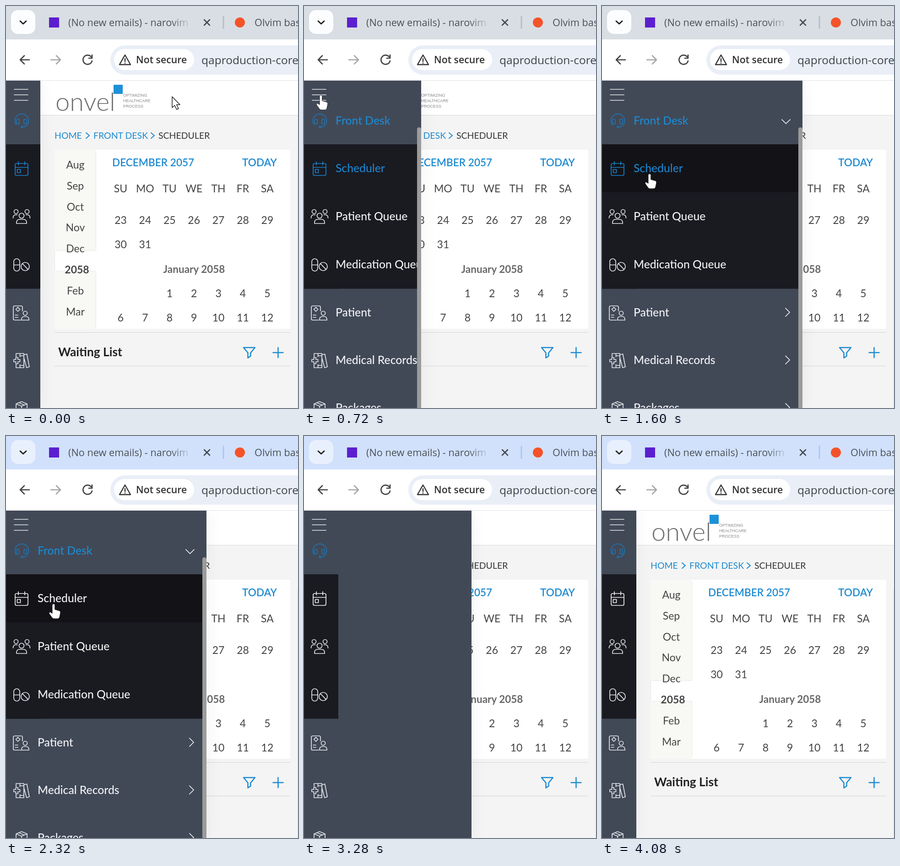
Write an HTML page that moves like this. It is 638 px wide and 878 px high and loops after 4.64 s.

```html
<!DOCTYPE html>
<html lang="en">
<head>
<meta charset="utf-8">
<title>Scheduler menu</title>
<style>
html, body { margin: 0; width: 100%; height: 100%; overflow: hidden; background: #f4f4f4; }
svg { position: absolute; left: 0; top: 0; display: block; }
text { font-family: Lato, sans-serif; white-space: pre; }
.ui text { font-family: "Open Sans", "Noto Sans", sans-serif; }
.line { fill: none; stroke: currentColor; stroke-width: 2; stroke-linecap: round; stroke-linejoin: round; }
.blue { fill: #1c8ad0; }
.mid { text-anchor: middle; }
#cal { font-size: 23px; fill: #444; }

#drawer {
  position: absolute; left: 0; top: 163px; width: 75px; height: 715px;
  overflow: hidden; background: #414957; color: #e4e6ea;
  box-shadow: 0 0 36px rgba(0, 0, 0, .06); clip-path: inset(0 -50px 0 0);
}
#drawer text { font-size: 24.7px; font-weight: 500; fill: currentColor; }
#drawer .line { stroke-width: 1.7; }
#thumb {
  position: absolute; right: 0; top: 102px; width: 9px; height: 640px;
  border-radius: 5px; background: #9b9b9b;
}

/* One step is 80 ms, 58 steps per loop */
.k { animation: 4.64s step-end infinite; }
#drawer { animation-name: slide; }
.open { animation-name: open; }
#hover { animation-name: hover; }
#cursor { animation-name: move; }
#arrow { animation-name: arrow; }
#hand { animation-name: hand; }
.fade { animation: 4.64s linear infinite; }
#strip { animation-name: strip; }
#tabs { animation-name: tabs; }
#sep { animation-name: sep; }
.sched { animation-name: sched; }

@keyframes slide {
  0% { width: 75px } 13.79% { width: 90px } 15.51% { width: 256px }
  17.24% { width: 385px } 18.96% { width: 429px } 20.68% { width: 438px }
  70.68% { width: 366px } 72.41% { width: 190px } 74.13% { width: 108px }
  75.86% { width: 81px } 77.58%, 100% { width: 75px }
}
@keyframes open { 0% { opacity: 0 } 13.79% { opacity: 1 } 68.96%, 100% { opacity: 0 } }
@keyframes hover { 0% { opacity: 0 } 32.75% { opacity: 1 } 67.24%, 100% { opacity: 0 } }
@keyframes move {
  0% { transform: translate(363px, 198px) } 1.72% { transform: translate(350px, 198px) }
  3.44% { transform: translate(315px, 199px) } 5.17% { transform: translate(262px, 200px) }
  6.89% { transform: translate(205px, 202px) } 8.62% { transform: translate(155px, 203px) }
  10.34% { transform: translate(115px, 204px) } 12.06% { transform: translate(87px, 204px) }
  13.79% { transform: translate(37px, 195px) } 29.31% { transform: translate(46px, 214px) }
  31.03% { transform: translate(70px, 272px) } 32.75% { transform: translate(95px, 338px) }
  34.48%, 100% { transform: translate(104px, 367px) }
}
@keyframes arrow { 0% { opacity: 1 } 13.79%, 100% { opacity: 0 } }
@keyframes hand { 0% { opacity: 0 } 13.79% { opacity: 1 } 67.24%, 100% { opacity: 0 } }
@keyframes strip { 0%, 42.5% { fill: #d9dee4 } 48.27%, 100% { fill: #d1e1fc } }
@keyframes tabs { 0%, 42.5% { fill: #fcfdfe } 48.27%, 100% { fill: #e9f0fd } }
@keyframes sep { 0%, 42.5% { fill: #b9bec5 } 48.27%, 100% { fill: #a8c7f8 } }
@keyframes sched { 0%, 42.5% { color: #1b84cc } 48.27%, 100% { color: #f2f2f4 } }
</style>
</head>
<body>
<svg width="638" height="878" viewBox="0 0 638 878">
  <defs>
    <linearGradient id="tail" gradientUnits="userSpaceOnUse" x1="360" x2="406" y1="0" y2="0">
      <stop stop-color="#4b5058"/><stop offset="1" stop-color="#4b5058" stop-opacity="0"/>
    </linearGradient>
  </defs>

  <g class="ui">
    <rect id="strip" class="fade" width="638" height="74"/>
    <rect id="tabs" class="fade" x="11" y="9" width="53" height="52" rx="15"/>
    <path class="line" style="stroke-width:3" color="#222" d="M31 33l6.500 6 6.500-6"/>
    <rect x="94" y="25" width="22" height="22" fill="#5b1fd0"/>
    <text x="136" y="44" font-size="21.700" fill="url(#tail)">(No new emails) - narovim</text>
    <path class="line" style="stroke-width:2.500" color="#44484e" d="M433 30l12 12M445 30l-12 12"/>
    <rect id="sep" class="fade" x="473.500" y="21" width="3" height="29" rx="1.500"/>
    <circle cx="511" cy="36" r="11" fill="#f4532a"/>
    <text x="543" y="44" font-size="21.700" fill="#4b5058">Olvim bas</text>

    <rect y="73" width="638" height="90" fill="#fff"/>
    <rect y="162" width="638" height="1" fill="#dfe1e4"/>
    <path class="line" style="stroke-width:2.600" color="#444" d="M51 117.500H31m9-9l-9 9 9 9"/>
    <path class="line" style="stroke-width:2.600" color="#a5a7aa" d="M98 117.500h21m-9-9l9 9-9 9"/>
    <path class="line" style="stroke-width:2.700" color="#444" d="M186 111a10 10 0 1 0 2 9M188 107v7h-7"/>
    <rect x="228" y="86" width="470" height="64" rx="32" fill="#e9eef7"/>
    <rect x="236" y="94" width="175" height="46" rx="23" fill="#fff"/>
    <path class="line" style="stroke-width:2.400" color="#333" d="M260 107l12 21h-24zM260 115v6M260 124.500v.200"/>
    <text x="284" y="125" font-size="21.300" font-weight="600" fill="#333">Not secure</text>
    <text x="427" y="127" font-size="24.500" fill="#3e4249">qaproduction-core</text>
  </g>

  <rect y="163" width="638" height="715" fill="#f4f4f4"/>
  <rect y="163" width="638" height="75" fill="#fff"/>
  <rect y="238" width="638" height="1" fill="#dadada"/>
  <text x="108" y="229" font-size="56" font-weight="300" fill="#6c6d70">onvel</text>
  <rect x="235" y="172" width="20" height="20" fill="#1d91d8"/>
  <g font-size="9" fill="#85878a">
    <text style="font-family:'Liberation Sans',sans-serif" x="256" y="198">OPTIMIZING<tspan x="256" dy="12">HEALTHCARE</tspan><tspan x="256" dy="12">PROCESS</tspan></text>
  </g>

  <g font-size="19.500">
    <text class="blue" x="106" y="290">HOME</text>
    <text class="blue" x="191" y="290">FRONT DESK</text>
    <text x="333" y="290" fill="#333">SCHEDULER</text>
    <path class="line" color="#1c8ad0" d="M175 277l7 6-7 6M317 277l7 6-7 6"/>
  </g>

  <g id="cal">
    <rect x="106" y="314" width="515" height="391" rx="4" fill="#fff"/>
    <rect x="106" y="314" width="91" height="391" rx="4" fill="#f8f8f5"/>
    <path d="M196.500 318v216H106.500v45H196.500v122" fill="none" stroke="#e7e7e4"/>
    <rect x="107" y="535" width="91" height="43.500" fill="#fff"/>
    <text class="blue" x="232" y="350" font-size="22.600" font-weight="600">DECEMBER 2057</text>
    <text class="blue" x="516" y="350" font-size="22.600" font-weight="600">TODAY</text>
    <text class="mid" x="411" y="583" font-size="22.500" font-weight="700" fill="#686868">January 2058</text>
  </g>

  <path d="M106 713h515M106 786.500h515" stroke="#dedede" stroke-width="1.500"/>
  <path d="M637.500 335v543" stroke="#dfdfdf"/>
  <text x="114" y="765" font-size="26.300" font-weight="700" fill="#222">Waiting List</text>
  <path class="line" style="stroke-width:2.500" color="#1c8ad0" d="M519 746h25l-9.500 11.500v7l-6 4v-11zM583.500 757h22M594.500 746v22"/>
</svg>

<div id="drawer" class="k">
  <svg width="438" height="715" viewBox="0 163 438 715">
    <rect y="302" width="75" height="315.500" fill="#1a1a21"/>
    <g class="k open">
      <rect y="302" width="438" height="315.500" fill="#1a1a21"/>
      <rect id="hover" class="k" y="302" width="438" height="105" fill="#131317"/>
    </g>

    <path class="line" d="M18 182h30M18 194h30M18 206h30"/>
    <g class="line" color="#2074b0">
      <path d="M22 259a15 15 0 1 1 25 0q-3 5-9 5"/>
      <rect x="23" y="247" width="6" height="11" rx="3"/><rect x="39" y="247" width="6" height="11" rx="3"/>
      <circle cx="35" cy="264" r="2"/>
    </g>
    <g class="line fade sched">
      <rect x="20" y="344" width="28" height="26" rx="3"/>
      <path d="M20 352.500h28M27 340v7M41 340v7"/><rect x="24.500" y="357" width="7" height="7"/>
    </g>
    <g class="line">
      <circle cx="34" cy="458" r="5.500"/><circle cx="22" cy="449" r="4.500"/><circle cx="46" cy="449" r="4.500"/>
      <path d="M23 475v-2q0-7 7-7h8q7 0 7 7v2zM15.500 463q0-7 6-7h3M52.500 463q0-7-6-7h-3"/>
    </g>
    <g class="line">
      <rect x="17" y="552" width="13" height="27" rx="6.500"/><path d="M17 565.500h13M35.700 562.700l12.600 12.600"/>
      <circle cx="42" cy="569" r="9"/>
    </g>
    <g class="line">
      <path d="M32 686H19q-3 0-3-3v-25q0-3 3-3h14q3 0 3 3v8M20 675h6M20 680h6M26 658l4.500 4.500-4.500 4.500-4.500-4.500z"/>
      <circle cx="42" cy="671" r="4.500"/><path d="M34 686v-2q0-6 8-6t8 6v2z"/>
    </g>
    <g class="line">
      <path d="M22 766v-7h17v31H22v-7M30.500 759v7M30.500 783v7M39 762l6.500-2 5.500 28-6 2-6-22M31 764h8M31 785h8"/>
      <path d="M17 772h4.500v-4.500H26v4.500h4.500v5H26v4.500h-4.500V777H17z"/>
    </g>
    <path class="line" d="M22 883v-14l12-5 12 5v14M22 869l12 5 12-5M34 874v9M28 866.500l12 5"/>

    <g class="k open" color="#f2f2f4">
      <text x="69" y="259" style="fill:#1c8ad0">Front Desk</text>
      <text class="fade sched" x="69" y="363">Scheduler</text>
      <text x="69" y="468">Patient Queue</text>
      <text x="69" y="573">Medication Queue</text>
      <text x="69" y="678">Patient</text>
      <text x="69" y="782">Medical Records</text>
      <text x="69" y="886">Packages</text>
      <path class="line" d="M393 248l9 9 9-9M401 660l9 9-9 9M401 764l9 9-9 9M401 868l9 9-9 9"/>
    </g>
  </svg>
  <div id="thumb" class="k open"></div>
</div>

<svg width="638" height="878" viewBox="0 0 638 878">
  <g id="cursor" class="k" fill="#fff" stroke="#222" stroke-width="1.500" stroke-linejoin="round">
    <path id="arrow" class="k" d="M0 0v24l5.500-5 4.500 9 4-2-4.300-8.500H17z"/>
    <path id="hand" class="k" stroke-width="1" d="M-3 2.500a2.900 2.900 0 0 1 5.800 0V12l9 2.500c2.500.800 3.300 2 3 5l-1.500 7.500c-.600 3.200-2 5-5 5H1c-2 0-3.500-1-4.800-3L-9.500 21c-1-2 1.200-4.200 3.200-2.800L-3 20.500z"/>
  </g>
</svg>

<script>
const cal = document.getElementById('cal');

function put(str, x, y, bold) {
  const el = document.createElementNS(cal.namespaceURI, 'text');
  el.setAttribute('class', 'mid');
  el.setAttribute('x', x);
  el.setAttribute('y', y);
  if (bold) el.setAttribute('font-weight', 700);
  el.textContent = str;
  cal.append(el);
}

function row(items, y, first = 0) {
  items.forEach((item, i) => put(item, 250.5 + 53.4 * (first + i), y));
}

const range = (from, to) => Array.from({ length: to - from + 1 }, (_, i) => from + i);

'Aug Sep Oct Nov Dec 2058 Feb Mar'.split(' ')
  .forEach((name, i) => put(name, i === 5 ? 155 : 151.5, 355 + 45.8 * i, i === 5));
row('SU MO TU WE TH FR SA'.split(' '), 407);
row(range(23, 29), 476);
row(range(30, 31), 529);
row(range(1, 5), 636, 2);
row(range(6, 12), 689);
</script>
</body>
</html>
```
